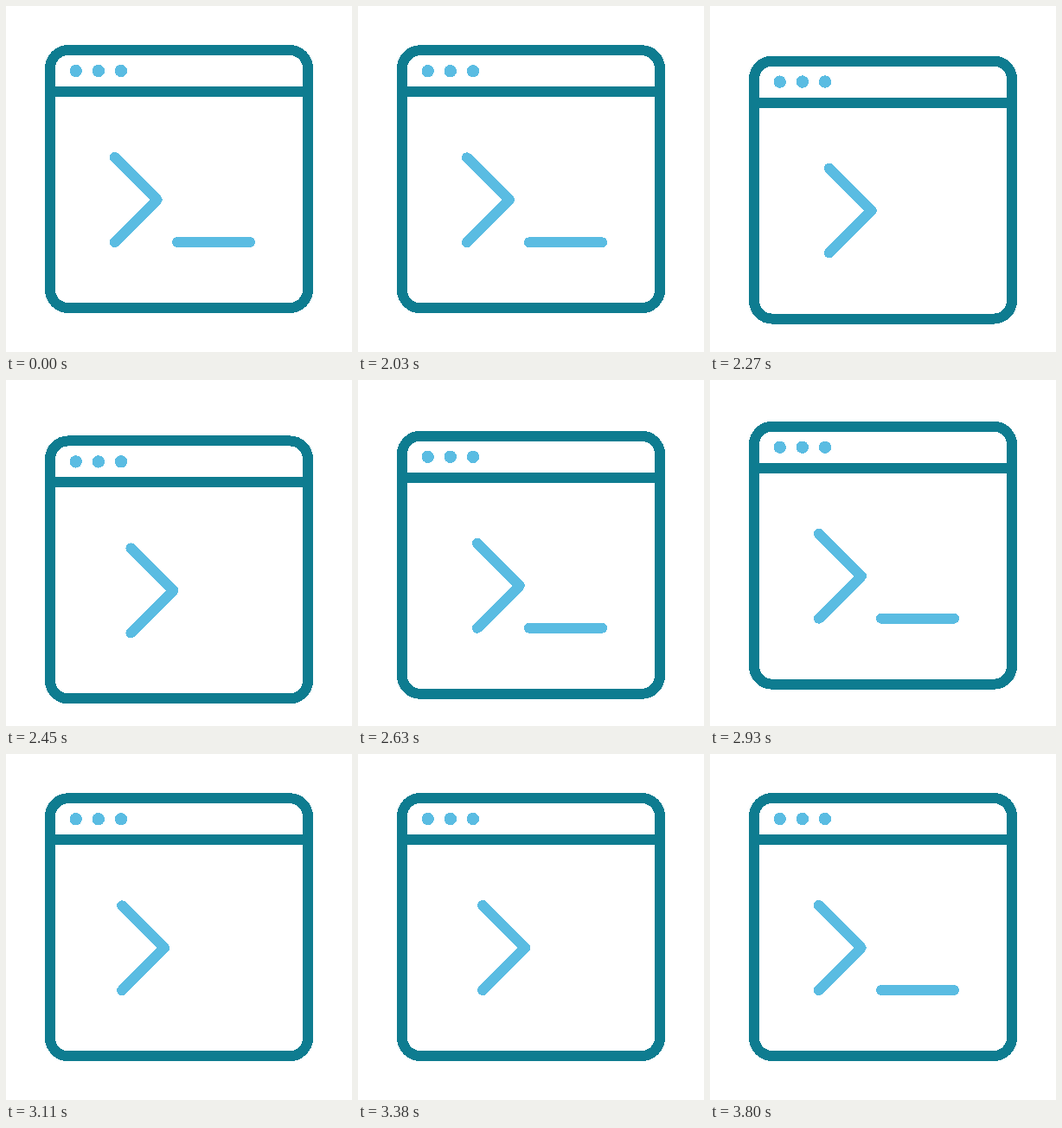
These frames come from a looping animation (400 by 400 pixels, 3830 ms). An HTML page:

```html
<!DOCTYPE html>
<html lang="en">
<head>
<meta charset="utf-8">
<title>Terminal window</title>
<style>
  html, body { margin: 0; width: 100%; height: 100%; overflow: hidden; background: #fff; }
  svg { display: block; width: 100vw; height: 100vh; }
  g { fill: none; stroke-width: 12; stroke-linecap: round; stroke-linejoin: round; shape-rendering: crispEdges; }
  .frame { stroke: #0e7c90; }
  .prompt { stroke: #5abce2; }
  circle { fill: #5abce2; stroke: none; }
</style>
</head>
<body>
<svg viewBox="0 0 400 400">
  <g id="icon">
    <g class="frame">
      <rect x="51" y="51" width="298" height="298" rx="21"/>
      <path d="M51 99H349"/>
    </g>
    <g class="prompt">
      <circle cx="80.7" cy="75" r="7.2"/>
      <circle cx="106.8" cy="75" r="7.2"/>
      <circle cx="133" cy="75" r="7.2"/>
      <path id="chevron" d="M125.7 175l49 49l-49 49"/>
      <path id="cursor" d="M198 273H282"/>
    </g>
  </g>
</svg>
<script>
const LOOP = 3830, REST = 2000, STEP = 30;
const [icon, chevron, cursor] = ['icon', 'chevron', 'cursor'].map(id => document.getElementById(id));

// Bezier easing with flat ends; x1 and x2 set the handle lengths.
function ease(u, x1 = 1 / 3, x2 = 2 / 3) {
  let lo = 0, hi = 1, s;
  for (let i = 0; i < 24; i++) {
    s = (lo + hi) / 2;
    const x = 3 * (1 - s) * s * ((1 - s) * x1 + s * x2) + s ** 3;
    if (x < u) lo = s; else hi = s;
  }
  return s * s * (3 - 2 * s);
}

function drop(k) {
  if (k <= 0 || k >= 40) return 0;
  return 19.4 * (k < 15 ? ease(k / 15) : 1 - ease((k - 15) / 25, 0.22, 0.4));
}

function draw(time) {
  const k = Math.max(0, Math.floor((time % LOOP - REST) / STEP));
  const beat = k % 30;
  const push = 18.75 * ease(1 - Math.abs(beat - 15) / 15);
  icon.setAttribute('transform', `translate(0 ${drop(k).toFixed(3)})`);
  chevron.setAttribute('transform', `translate(${push.toFixed(3)} 0)`);
  cursor.style.visibility = beat >= 5 && beat < 19 ? 'hidden' : 'visible';
}

function tick() {
  draw(performance.now());
  requestAnimationFrame(tick);
}
tick();
</script>
</body>
</html>
```
